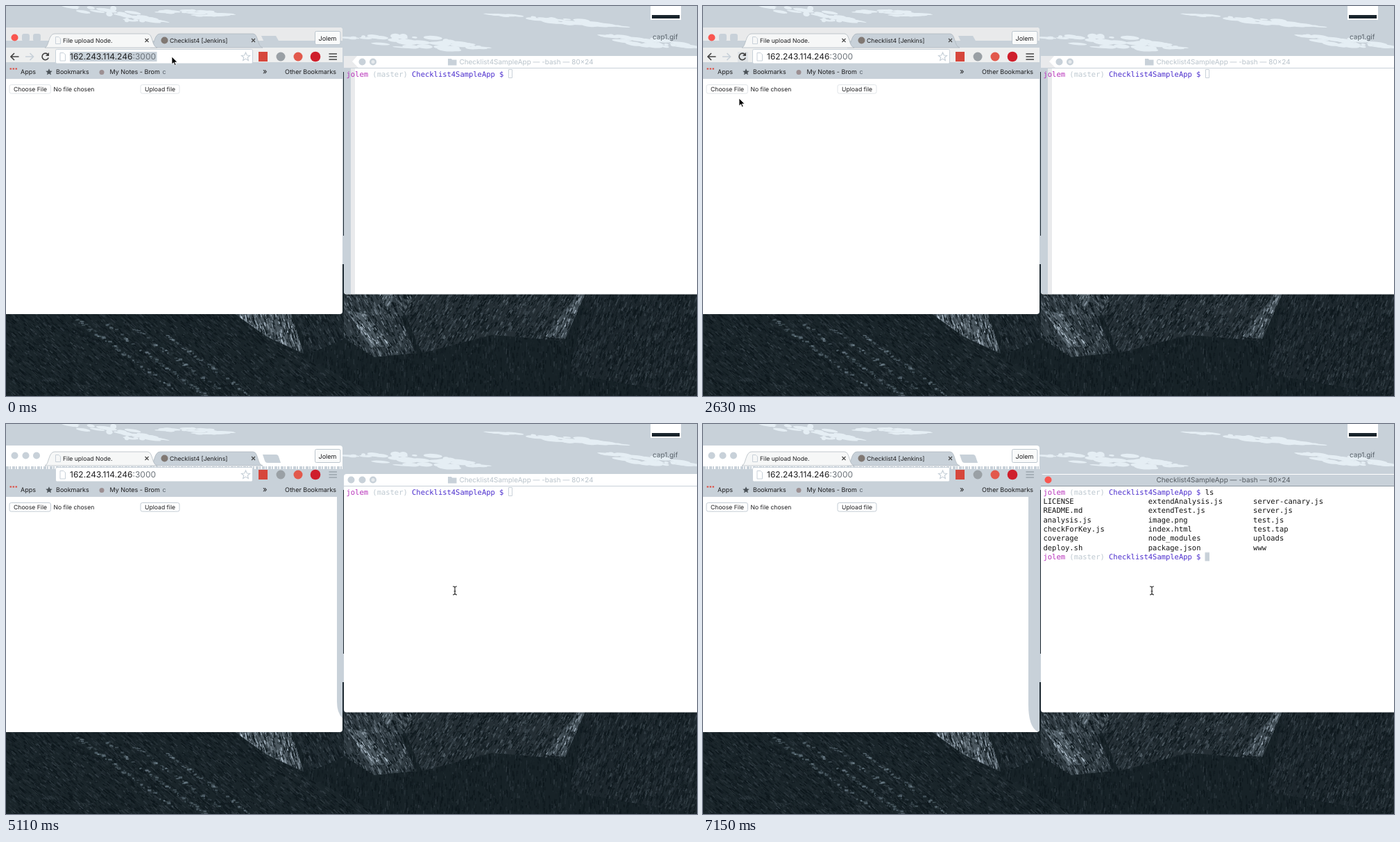
Animation of 996 by 562 pixels, one loop 8000 ms. Source, as an HTML page with a canvas:

```html
<!DOCTYPE html>
<html lang="en">
<head>
<meta charset="utf-8">
<title>File upload demo</title>
<style>
  html, body { margin: 0; width: 100%; height: 100%; overflow: hidden; background: #c8d1d9; }
  canvas, svg { position: absolute; left: 0; top: 0; width: 996px; height: 562px; }
  svg { --sky: #c8d1d9; text-rendering: geometricPrecision; }
  text { font: 9px Inter, Roboto, sans-serif; fill: #1c1c1e; }
  .small { font-size: 8.65px; }
  .url { font-size: 12px; }
  .title { font-size: 9.95px; text-anchor: middle; fill: #b9c3cb; }
  .active { fill: #545a60; }
  .muted { fill: #59636b; }
  .mono, .mono text { font: 10.47px "DejaVu Sans Mono", monospace; white-space: pre; fill: #111; }
  .user { fill: #b62fb9; }
  .branch { fill: #bdc8d0; }
  .path { fill: #4a2ccd; }
  .sky { fill: var(--sky); }
  .white { fill: #fff; }
  .line { fill: none; stroke: var(--sky); }
  .dark { fill: none; stroke: #444; stroke-width: 1.7; }
  .tab { stroke: #a9b3bb; stroke-width: .7; }
  .edge { fill: #fff; animation: edge 8s step-end infinite; }
  .caret { animation: caret 8s step-end infinite; }
  .cursor { animation: move 8s step-end infinite; }

  @keyframes edge { 0% { stroke: #e0e4e8 } 53.875%, 100% { stroke: #c3ccd4 } }
  @keyframes caret {
    0% { transform: none }
    85.25% { transform: translate(6.3px, 0) }
    87.25% { transform: translate(12.6px, 0) }
    89.375%, 100% { transform: translate(0, 93.5px) }
  }
  /* Each leg is a straight move in a few equal jumps. */
  @keyframes move {
    0% { transform: translate(239px, 73px) }
    6.75% { transform: translate(239px, 75px) }
    17.125% { transform: translate(239px, 75px); animation-timing-function: steps(3, jump-start) }
    23.5% { transform: translate(111.5px, 158.5px); animation-timing-function: steps(4, jump-start) }
    31% { transform: translate(60px, 140px) }
    32.875% { transform: translate(60px, 140px); animation-timing-function: steps(3, jump-start) }
    38.5% { transform: translate(36px, 119px); animation-timing-function: steps(3, jump-start) }
    44.125% { transform: translate(114.5px, 150px) }
    53.875% { transform: translate(114.5px, 150px); animation-timing-function: steps(3, jump-start) }
    59.3125%, 100% { transform: translate(647px, 240px) }
  }
</style>
</head>
<body>
<canvas id="wall" width="996" height="562"></canvas>
<!-- data-show: start and end of visibility in ms -->
<svg viewBox="0 0 996 562">
  <defs>
    <text id="prompt" class="mono"><tspan class="user">jolem</tspan> <tspan class="branch">(master)</tspan> <tspan class="path">Checklist4SampleApp $</tspan></text>
    <path id="tab" d="M56 60C62 59 61 40 70 40H204C212 40 210 59 218 60Z"/>
    <path id="star" d="M0-6 1.8-2 6-1.6 2.8 1.2 3.8 5.4 0 3.1-3.8 5.4-2.8 1.2-6-1.6-1.8-2Z"/>
    <path id="menu" d="M465.5 69H477M465.5 73H477M465.5 77H477"/>
    <path id="close" d="M-2.5-2.5 2.5 2.5M2.5-2.5-2.5 2.5"/>
    <circle id="dot" r="5"/>
    <path id="arrow" stroke="#fff" stroke-width=".8" d="M0 0V11L2.6 8.6 4.3 12.6 6.1 11.8 4.4 8H8Z"/>
    <path id="beam" fill="none" stroke="#333" stroke-width="1.2" d="M-3-6Q0-6 0-4Q0-6 3-6M0-4V4M-3 6Q0 6 0 4Q0 6 3 6M-1.5 1H1.5"/>
  </defs>

  <!-- Desktop file -->
  <path class="white" d="M929 0H973V20H929Z"/>
  <path fill="#19242c" d="M931 13H971V18H931Z"/>
  <text class="muted" x="932" y="47.5" style="font-size:10px">cap1.gif</text>

  <!-- Gap between the windows -->
  <path fill="#1b2730" d="M486 95H487V331H486ZM485 372H487V416H485Z"/>

  <!-- Terminal -->
  <path class="white" d="M487 76Q487 72 491 72H996V415.5H491Q487 415.5 487 411Z"/>
  <g data-show="0 5110">
    <path class="sky" d="M487 90H497V415H491Q487 415 487 411Z"/>
    <path fill="#e9eaec" d="M497 90H503V415H497ZM487 72H506L499 80 508 89H487Z"/>
    <g data-show="4450 5110">
      <path class="sky" d="M497 149H499V254H497Z"/>
      <path fill="#eeeff0" d="M499 149H509V254H499Z"/>
    </g>
  </g>
  <g data-show="0 5290">
    <path class="line" d="M487 89.5H996M724.5 91.5H729.5V103.5H724.5Z"/>
    <g class="sky">
      <use href="#dot" x="513.5" y="80.5"/><use href="#dot" x="529" y="80.5"/>
      <path d="M637 76H642L643 77.5H649.5V85.5H637Z"/>
    </g>
    <circle cx="529" cy="80.5" r="2.5" fill="#e6eaed"/>
    <text class="title" x="750" y="84">Checklist4SampleApp — -bash — 80×24</text>
  </g>
  <use href="#dot" class="sky" x="497.5" y="80.5" data-show="5110 5290"/>
  <g data-show="5290">
    <path class="sky" d="M487 73H996V89H487Z"/>
    <path stroke="#8f9aa3" d="M487 89.5H996"/>
    <use href="#dot" x="497.5" y="80.5" fill="#f9564f"/>
    <text class="title active" x="750" y="84">Checklist4SampleApp — -bash — 80×24</text>
    <path class="caret sky" d="M723.5 91.5H730V104H723.5Z"/>
  </g>
  <use href="#prompt" x="490.5" y="101.5"/>
  <g class="mono">
    <text data-show="6820" x="723.7" y="101.5">l</text>
    <text data-show="6980" x="730" y="101.5">s</text>
    <g data-show="7150"><g id="files"></g><use href="#prompt" x="490.5" y="195"/></g>
  </g>

  <!-- Browser -->
  <path class="white" d="M0 31H481Q485 31 485 35V440Q485 444 481 444H0Z"/>
  <g data-show="0 5110">
    <path fill="#e9eaeb" d="M0 31H481Q485 31 485 35V50H0Z"/>
    <path class="sky" d="M0 50H485V105H0Z"/>
    <path fill="#eeefef" d="M0 60H485V81H0Z"/>
    <use href="#dot" x="12.5" y="45.5" fill="#f9564f"/>
    <g class="sky">
      <rect x="23" y="40" width="11" height="11" rx="3"/><rect x="39" y="40" width="11" height="11" rx="3"/>
      <path d="M368 43H389L394 52H372Z"/>
    </g>
  </g>
  <g data-show="5110" class="sky">
    <path d="M0 65H485V105H0Z"/>
    <path class="line" stroke-width="4" stroke-dasharray="4 1 2 2" d="M0 63H485"/>
    <use href="#dot" x="12.5" y="45.5"/><use href="#dot" x="28.5" y="45.5"/><use href="#dot" x="44" y="45.5"/>
    <path d="M370 44H389Q392 44 393 47L396 56H377Q374 56 373 53Z"/>
  </g>
  <path class="sky" data-show="5110 5290" d="M477 105H485V424Q477 416 477 400Z"/>
  <path class="sky" data-show="5290" d="M469 105H485V440Q485 443 482 443Q469 436 469 404Z"/>

  <use href="#tab" x="152" class="tab sky"/>
  <use href="#tab" class="tab" fill="#f6f7f7"/>
  <path class="line" d="M71.5 44.5H76L78.5 47V54.5H71.5Z"/>
  <use href="#dot" x="228.5" y="49.5" fill="#807873"/>
  <text class="small" x="82" y="52.5">File upload Node.</text>
  <text class="small" x="236" y="52.5">Checklist4 [Jenkins]</text>
  <use href="#close" x="203" y="49.5" class="dark" style="stroke-width:1.1"/>
  <use href="#close" x="356.5" y="49.5" class="dark" style="stroke-width:1.1"/>
  <rect x="445.5" y="36.5" width="36.5" height="19" rx="2" fill="#f9fafa" stroke="#bcc6ce"/>
  <text x="463.5" y="49.5" text-anchor="middle">Jolem</text>

  <g data-show="0 5110">
    <path data-show="540 5110" fill="#dfe3e6" d="M50 66H65V81H50Z"/>
    <path class="dark" d="M18.5 73H7.5M12 68 7 73 12 78M60.5 70A4.7 4.7 0 1 0 61.2 74.5"/>
    <path class="line" stroke-width="1.7" d="M28 73H39M34.5 68 39.5 73 34.5 78"/>
    <path fill="#444" d="M62 67V72H57Z"/>
    <use href="#menu" class="dark"/>
  </g>
  <use href="#menu" data-show="5110" stroke="#9aa5ad" stroke-width="1.5"/>
  <rect x="71.5" y="62.5" width="284" height="20.5" rx="2" fill="#fff" stroke="#c8d1d9"/>
  <path class="line" d="M78 67.5H83L85.5 70V79H78Z"/>
  <path class="sky" data-show="0 150" d="M92 66H217.5V80H92Z"/>
  <text class="url" x="92" y="77">162.243.114.246<tspan fill="#6c737a">:3000</tspan></text>
  <use href="#star" x="345.5" y="73" class="line" stroke-width="1.2"/>
  <path fill="#d6473c" d="M364 66H377V80H364Z"/>
  <circle cx="396" cy="73" r="6.5" fill="#9aa0a5"/>
  <circle cx="421" cy="73" r="6.5" fill="#e2594c"/>
  <circle cx="446" cy="73" r="7.3" fill="#cf1f2c"/>

  <path stroke="#dc4a40" stroke-width="1.8" stroke-dasharray="2.5 1.5" d="M5.5 90.5H16"/>
  <text x="21" y="98">Apps</text>
  <use href="#star" transform="translate(62 95) scale(.8)" fill="#4c5359"/>
  <text x="72" y="98">Bookmarks</text>
  <circle cx="138" cy="95.5" r="3.5" fill="#9c8f92"/>
  <text x="149.5" y="98">My Notes - Brom</text>
  <text class="muted" x="225.5" y="98">c</text>
  <text x="370" y="98" style="font-size:11px">»</text>
  <text x="402" y="98">Other Bookmarks</text>

  <rect class="line" data-show="2930 4310" x="2.5" y="110.5" width="189.5" height="18.5" rx="2" stroke-width="3.5"/>
  <rect class="edge" x="5" y="113.5" width="59.5" height="12.5" rx="2.5"/>
  <rect class="edge" x="194" y="113.5" width="56" height="12.5" rx="2.5"/>
  <text class="small" x="11" y="122.7">Choose File</text>
  <text class="small" x="68.5" y="122.7">No file chosen</text>
  <text class="small" x="200" y="122.7">Upload file</text>

  <g class="cursor">
    <use href="#arrow" data-show="0 540"/><use href="#arrow" data-show="2630 4600"/>
    <use href="#beam" data-show="540 2630"/><use href="#beam" data-show="4600"/>
  </g>
</svg>
<script>
  const loop = 8000;
  let rules = '';
  document.querySelectorAll('[data-show]').forEach((el, i) => {
    const [from, to = loop] = el.dataset.show.split(' ').map(Number);
    const pct = ms => ms / loop * 100 + '%';
    rules += `@keyframes show${i} {
      0% { visibility: hidden } ${pct(from)} { visibility: visible }
      ${pct(to)}, 100% { visibility: ${to < loop ? 'hidden' : 'visible'} } }`;
    el.style.animation = `show${i} ${loop}ms step-end infinite`;
  });
  document.head.appendChild(document.createElement('style')).textContent = rules;

  const columns = [
    'LICENSE README.md analysis.js checkForKey.js coverage deploy.sh',
    'extendAnalysis.js extendTest.js image.png index.html node_modules package.json',
    'server-canary.js server.js test.js test.tap uploads www'
  ];
  document.getElementById('files').innerHTML = columns.map((names, col) =>
    names.split(' ').map((name, row) =>
      `<text x="${490.5 + col * 151.3}" y="${101.5 + (row + 1) * 13.36}">${name}</text>`
    ).join('')).join('');

  // Wallpaper: cloud wisps over a dark valley.
  const g = document.getElementById('wall').getContext('2d');
  let seed = 7;
  const rnd = () => (seed = seed * 16807 % 2147483647) / 2147483647;
  const mix = (a, b, k) => a + (b - a) * k;

  function cloud(x, y, w, h, drop) {
    g.fillStyle = '#e5eef4';
    for (let i = 0; i < w / 4; i++) {
      const u = rnd(), thick = h * Math.sin(Math.PI * u);
      g.beginPath();
      g.ellipse(x + u * w, y + u * drop + (rnd() - 0.5) * thick,
        3 + rnd() * 13, 1 + rnd() * thick / 6, drop / w, 0, 7);
      g.fill();
    }
  }

  // Fills a rock face and scatters slanted flecks, from dark to the given tone.
  function face(points, tone, density, slant) {
    const xs = points.map(p => p[0]), ys = points.map(p => p[1]);
    const x0 = Math.min(...xs), y0 = Math.min(...ys);
    const w = Math.max(...xs) - x0, h = Math.max(...ys) - y0;
    const shade = k => `rgb(${mix(13, 200, k)},${mix(23, 216, k)},${mix(28, 230, k)})`;
    g.save();
    g.beginPath();
    points.forEach(p => g.lineTo(...p));
    g.clip();
    g.fillStyle = shade(tone * 0.35);
    g.fillRect(x0, y0, w, h);
    for (let i = 0; i < w * h * density; i++) {
      const x = x0 + rnd() * w, y = y0 + rnd() * h, len = 2 + rnd() * 7;
      g.strokeStyle = shade(tone * rnd() ** 2);
      g.lineWidth = 0.6 + rnd() * 1.4;
      g.beginPath();
      g.moveTo(x, y);
      g.lineTo(x + Math.cos(slant) * len, y + Math.sin(slant) * len);
      g.stroke();
    }
    g.restore();
  }

  g.fillStyle = '#c8d1d9';
  g.fillRect(0, 0, 996, 562);
  cloud(85, 0, 140, 16, 22);
  cloud(215, 8, 105, 9, 4);
  cloud(490, 46, 200, 20, 14);
  cloud(700, 12, 190, 9, 18);
  cloud(855, 42, 140, 14, 18);

  face([[0, 410], [996, 410], [996, 562], [0, 562]], 0.16, 0.06, 1.6);
  face([[560, 410], [835, 410], [800, 482], [700, 474], [600, 500]], 0.36, 0.12, 2.1);
  face([[778, 476], [826, 412], [836, 412], [806, 480]], 0.8, 0.12, 2);
  face([[487, 410], [590, 410], [570, 450], [590, 500], [530, 506], [487, 478]], 0.55, 0.12, 1.1);
  face([[490, 438], [520, 444], [556, 490], [526, 492]], 1, 0.12, 1);
  face([[535, 410], [563, 410], [550, 438]], 1, 0.12, 2);
  face([[325, 440], [410, 440], [429, 501], [375, 476]], 0.95, 0.14, 1.3);
  face([[412, 440], [487, 440], [487, 480], [440, 500]], 0.28, 0.12, 1.1);
  face([[838, 410], [996, 410], [996, 562], [812, 530]], 0.24, 0.12, 1.9);

  face([[0, 440], [315, 440], [400, 492], [540, 562], [0, 562]], 0.2, 0.1, 0.7);
  // Scree runs down the left slope.
  for (let i = 0; i < 260; i++) {
    const run = i % 4, u = rnd();
    const x = 90 + run * 45 + u * 150 + rnd() * 8, y = 446 + run * 9 + u * 108;
    g.fillStyle = `rgba(128,148,160,${0.15 + rnd() * 0.4})`;
    g.fillRect(x, y, 1 + rnd() * 5, 1 + rnd() * 2);
  }
</script>
</body>
</html>
```
